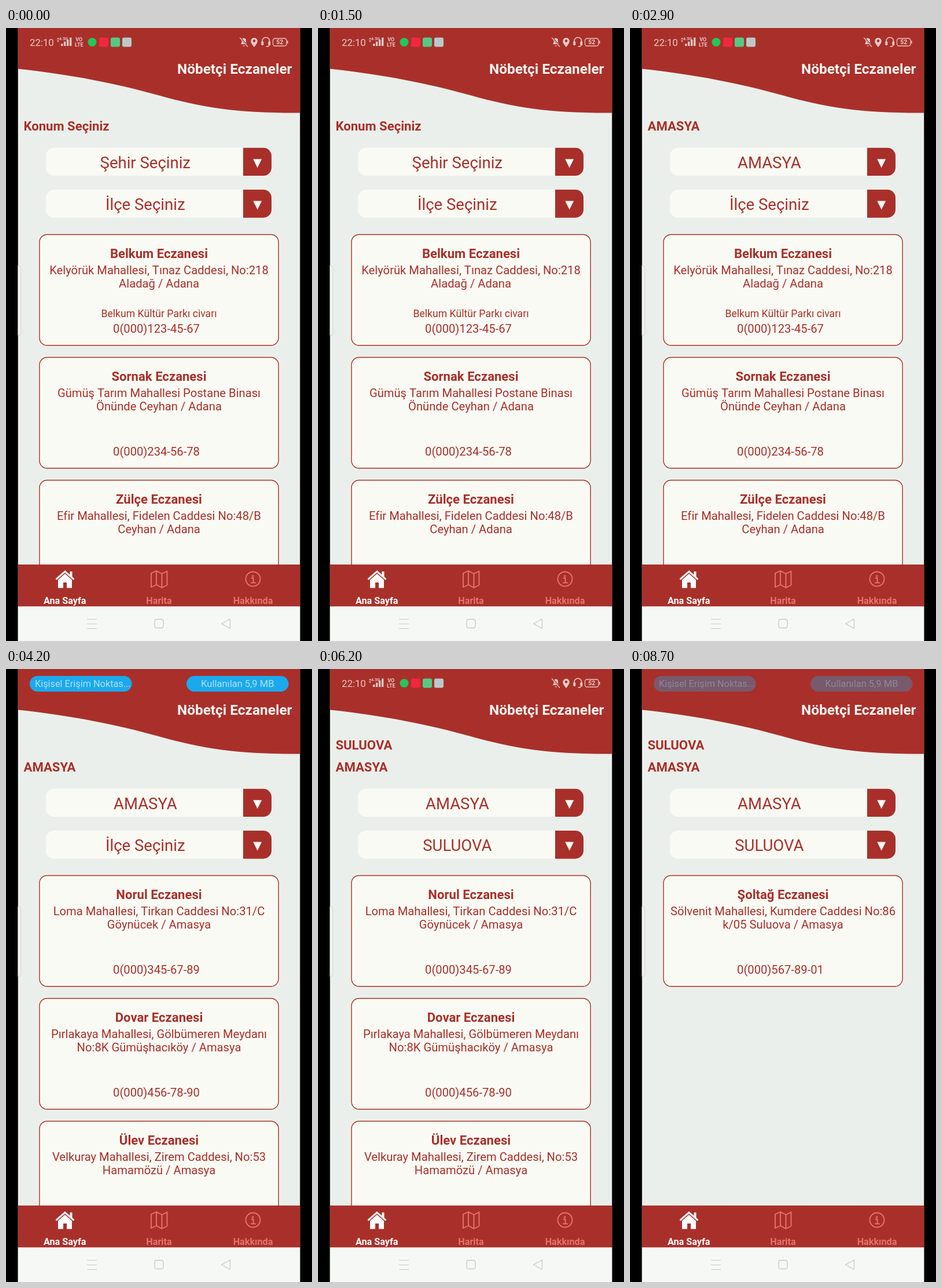
Recreate the animation shown at these times as an HTML page with a canvas. Size 529 by 1058 pixels, loop 8.8 s.

```html
<!DOCTYPE html>
<html lang="tr">
<head>
<meta charset="utf-8">
<title>Nöbetçi Eczaneler</title>
<style>
html, body { margin: 0; width: 100%; height: 100%; overflow: hidden; background: #000; }
canvas { display: block; width: 529px; height: 1058px; }
</style>
</head>
<body>
<canvas id="stage" width="529" height="1058"></canvas>
<script>
const ctx = document.getElementById('stage').getContext('2d');
const LOOP = 8800;
const RED = '#a9302a', CREAM = '#fafaf4', PALE = '#ebefeb', FAINT = '#e6736e', STATUS = '#e9c8c4';
const LEFT = 20.5, RIGHT = 508.5, ROW = 48.1;

const NATIONAL = [
  ['Belkum Eczanesi', 'Kelyörük Mahallesi, Tınaz Caddesi, No:218', 'Aladağ / Adana', 'Belkum Kültür Parkı civarı', '0(000)123-45-67'],
  ['Sornak Eczanesi', 'Gümüş Tarım Mahallesi Postane Binası', 'Önünde Ceyhan / Adana', '', '0(000)234-56-78'],
  ['Zülçe Eczanesi', 'Efir Mahallesi, Fidelen Caddesi No:48/B', 'Ceyhan / Adana', '', '']
];
const PROVINCE = [
  ['Norul Eczanesi', 'Loma Mahallesi, Tirkan Caddesi No:31/C', 'Göynücek / Amasya', '', '0(000)345-67-89'],
  ['Dovar Eczanesi', 'Pırlakaya Mahallesi, Gölbümeren Meydanı', 'No:8K Gümüşhacıköy / Amasya', '', '0(000)456-78-90'],
  ['Ülev Eczanesi', 'Velkuray Mahallesi, Zirem Caddesi, No:53', 'Hamamözü / Amasya', '', '']
];
const DISTRICT = [
  ['Şoltağ Eczanesi', 'Sölvenit Mahallesi, Kumdere Caddesi No:86', 'k/05 Suluova / Amasya', '', '0(000)567-89-01']
];
const CITIES = ['ADANA', 'ADIYAMAN', 'AFYONKARAHISAR', 'AĞRI', 'AMASYA', 'ANKARA'];
const TOWNS = ['MERKEZ', 'MERZIFON', 'SULUOVA', 'TAŞOVA', 'GÜMÜŞHACIKÖY', 'GÖYNÜCEK'];

const ramp = (t, from, to) => Math.max(0, Math.min(1, (t - from) / (to - from)));
const pulse = (t, a, b, c, d) => ramp(t, a, b) * (1 - ramp(t, c, d));

function fade(alpha, draw) {
  if (alpha <= 0) return;
  ctx.save();
  ctx.globalAlpha *= alpha;
  draw();
  ctx.restore();
}

function text(str, x, y, size, color = RED, weight = 400, align = 'center') {
  ctx.font = `${weight} ${size}px Roboto, sans-serif`;
  ctx.textAlign = align;
  ctx.fillStyle = color;
  ctx.fillText(str, x, y);
}

function rect(x, y, w, h, color) {
  ctx.fillStyle = color;
  ctx.fillRect(x, y, w, h);
}

function round(x, y, w, h, radii, fill, stroke, width = 1.5) {
  ctx.beginPath();
  ctx.roundRect(x, y, w, h, radii);
  if (fill) { ctx.fillStyle = fill; ctx.fill(); }
  if (stroke) { ctx.strokeStyle = stroke; ctx.lineWidth = width; ctx.stroke(); }
}

function path(d, fill, stroke, width = 1.5) {
  const p = new Path2D(d);
  if (fill) { ctx.fillStyle = fill; ctx.fill(p); }
  if (stroke) {
    ctx.strokeStyle = stroke;
    ctx.lineWidth = width;
    ctx.lineJoin = ctx.lineCap = 'round';
    ctx.stroke(p);
  }
}

function header() {
  path(`M${LEFT} 0H${RIGHT}V146.500C400 147 340 137.500 265 116.500C190 95.500 110 80 ${LEFT} 70.500Z`, RED);
  text('Nöbetçi Eczaneler', 494.5, 79, 24.4, '#fbf5f1', 700, 'right');
}

function select(label, y) {
  round(69, y, 390, 48.3, 14, CREAM);
  round(410, y, 49, 48.3, [0, 14, 14, 0], RED);
  path(`M427.300 ${y + 19.5}h14.800l-7.400 15z`, '#fdfaf6');
  text(label, 240.8, y + 34.7, 27.5);
}

function card([name, line1, line2, note, phone], y) {
  round(57.9, y + 0.5, 413.2, 191.2, 13, CREAM, RED, 1.4);
  text(name, 264.5, y + 41, 22.1, RED, 700);
  text(line1, 264.5, y + 69, 20.2);
  text(line2, 264.5, y + 92.4, 20.2);
  text(note, 264.5, y + 143.3, 17.65);
  text(phone, 260, y + 170, 20.2);
}

function tabs() {
  rect(LEFT, 926, 488, 72.5, RED);
  path('M102 936L85.5 950.5L87.5 952.7L102 940L116.500 952.7L118.500 950.5L114.500 947V938H110.500V943.5Z', '#fff');
  path('M102 942L90 952.5V966.5H99V957H105V966.5H114V952.5Z', '#fff');
  path('M251 941L260 937L269.500 942L278.500 937.5V961.5L269.500 966L260 961L251 965ZM260 937V961M269.500 942V966', null, FAINT, 1.9);
  path('M439.500 951A12.500 12.500 0 1 1 414.500 951A12.500 12.500 0 1 1 439.500 951M424.500 949.5H427.500V957M424 957.500H431', null, FAINT, 1.9);
  path('M425.300 944.500h3v3h-3z', FAINT);
  text('Ana Sayfa', 101.7, 994, 16.2, '#fff', 700);
  text('Harita', 264.5, 994, 16.2, FAINT, 700);
  text('Hakkında', 427, 994, 16.2, FAINT, 700);
}

function systemNav() {
  rect(LEFT, 998.5, 488, 60, '#f5f8f4');
  const gray = '#c7cbc7';
  path('M140.500 1020.500H156.500M140.500 1028.500H156.500M140.500 1036.500H156.500', null, gray, 1.2);
  round(257, 1020.5, 15, 15, 3.5, null, gray, 1.3);
  path('M387.500 1020V1036.500L372.500 1028.300Z', null, gray, 1.2);
}

function statusIcons() {
  text('22:10', 41, 31, 16.8, STATUS, 400, 'left');
  text('4.5G', 99.500, 21, 7, STATUS, 700);
  path('M88 19.500l2 -3l2 3zM88 21.500h4l-2 3z', STATUS);
  for (let i = 0; i < 4; i++) {
    const h = 4 + i * 3.5;
    rect(95 + i * 5, 31 - h, 3.4, h, STATUS);
  }
  text('VO', 126.3, 23, 9, STATUS, 700);
  text('LTE', 126.3, 32, 9, STATUS, 700);
  ctx.beginPath();
  ctx.arc(149, 24.5, 7.5, 0, 7);
  ctx.fillStyle = '#25c45c';
  ctx.fill();
  round(161, 16.5, 16, 16, 3, '#f0273f');
  round(181, 16.5, 16, 16, 3, '#55ca85');
  round(201, 16.5, 16, 16, 3, '#bcc8ca');

  path('M406 28H416.500L415 25V21.500Q415 17.500 411.200 17.500Q407.500 17.500 407.500 21.500V25ZM409.500 30h3.500l-1.700 2z', STATUS);
  path('M405 17L418 32', null, RED, 3);
  path('M404.500 17L417.500 32', null, STATUS, 1.3);
  path('M429 33C425 28 423.300 25.500 423.300 22.500A5.700 5.700 0 0 1 434.700 22.500C434.700 25.500 433 28 429 33Z', STATUS);
  ctx.beginPath();
  ctx.arc(429, 22.3, 2.2, 0, 7);
  ctx.fillStyle = RED;
  ctx.fill();
  path('M443 25V22.500A6.300 6.300 0 0 1 455.600 22.500V28Q455.600 32 450 32', null, STATUS, 1.6);
  round(441.3, 23, 4, 7, 1.7, STATUS);
  round(453.3, 23, 4, 7, 1.7, STATUS);
  round(461.5, 18, 23.5, 13, 3.5, null, STATUS, 1.3);
  rect(486, 22, 1.5, 5, STATUS);
  text('52', 473.3, 28.3, 10.5, STATUS, 700);
}

function statusPills() {
  const ink = '#b4e0f7';
  round(41, 12, 176.5, 27, 13.5, '#1ba9ed');
  round(312, 12, 176.5, 27, 13.5, '#1ba9ed');
  text('Kişisel Erişim Noktas...', 50, 31.3, 16.3, ink, 400, 'left');
  text('Kullanılan 5,9 MB', 400.3, 31.3, 16.5, ink);
}

function dropdown(items, top, scrollable) {
  rect(LEFT, 0, 488, 38.5, '#ad322b');
  rect(LEFT, 38.5, 488, 960, 'rgba(0,0,0,.42)');
  const height = ROW * items.length;
  ctx.save();
  ctx.shadowColor = 'rgba(0,0,0,.45)';
  ctx.shadowBlur = 12;
  ctx.shadowOffsetY = 4;
  round(70, top, 389, height, 13, CREAM);
  ctx.restore();
  ctx.save();
  ctx.beginPath();
  ctx.roundRect(70, top, 389, height, 13);
  ctx.clip();
  items.forEach((item, i) => {
    text(item, 266, top + i * ROW + 34.2, 27.5);
    rect(70, top + (i + 1) * ROW - 1.4, 389, 1.4, RED);
  });
  ctx.restore();
  round(70, top, 389, height, 13, null, 'rgba(169,48,42,.55)', 1);
  if (scrollable) rect(450, top + 2, 5.5, 65, '#b8b8b4');
}

function touch(x, y) {
  ctx.beginPath();
  ctx.arc(x, y, 15.5, 0, 7);
  ctx.fillStyle = 'rgba(250,250,250,.5)';
  ctx.fill();
  ctx.strokeStyle = 'rgba(190,198,208,.7)';
  ctx.lineWidth = 2.5;
  ctx.stroke();
}

function edgeHandle(lit) {
  const g = Math.round(242 - 12 * lit);
  round(16, 410, 9.5, 120.5, 4, `rgb(${g},${g + 2},${g})`, `rgba(200,200,200,${0.8 - 0.5 * lit})`, 1);
}

function draw(t) {
  const cityChosen = t >= 2700, townChosen = t >= 5850;
  const cityMenu = pulse(t, 1920, 2060, 2640, 2790);
  const townMenu = pulse(t, 4720, 4860, 5790, 5940);
  const pills = Math.max(t < 4900 ? ramp(t, 3640, 3960) : 0, ramp(t, 8560, 8980));
  const icons = 1 - Math.max(pulse(t, 3540, 3660, 4900, 4901), ramp(t, 8400, 8550));
  const cards = t < 3600 ? NATIONAL : t < 7800 ? PROVINCE : DISTRICT;

  rect(0, 0, 529, 1058, '#000');
  ctx.save();
  ctx.beginPath();
  ctx.rect(LEFT, 0, RIGHT - LEFT, 1058);
  ctx.clip();
  rect(LEFT, 0, 488, 1058, PALE);
  header();
  if (townChosen) text('SULUOVA', 30.5, 139, 22.1, RED, 700, 'left');
  text(cityChosen ? 'AMASYA' : 'Konum Seçiniz', 30.5, 177, 22.1, RED, 700, 'left');
  select(cityChosen ? 'AMASYA' : 'Şehir Seçiniz', 206.8);
  select(townChosen ? 'SULUOVA' : 'İlçe Seçiniz', 279.1);
  cards.forEach((c, i) => card(c, 356 + i * 212));
  tabs();
  fade(icons, statusIcons);
  fade(pills, statusPills);
  fade(cityMenu, () => dropdown(CITIES, 258, true));
  fade(townMenu, () => dropdown(TOWNS, 330, false));
  fade(pulse(t, 2280, 2360, 2460, 2600), () => touch(298, 474));
  systemNav();
  edgeHandle(Math.max(cityMenu, townMenu));
  ctx.restore();
}

function tick() {
  draw(performance.now() % LOOP);
  requestAnimationFrame(tick);
}
tick();
</script>
</body>
</html>
```
